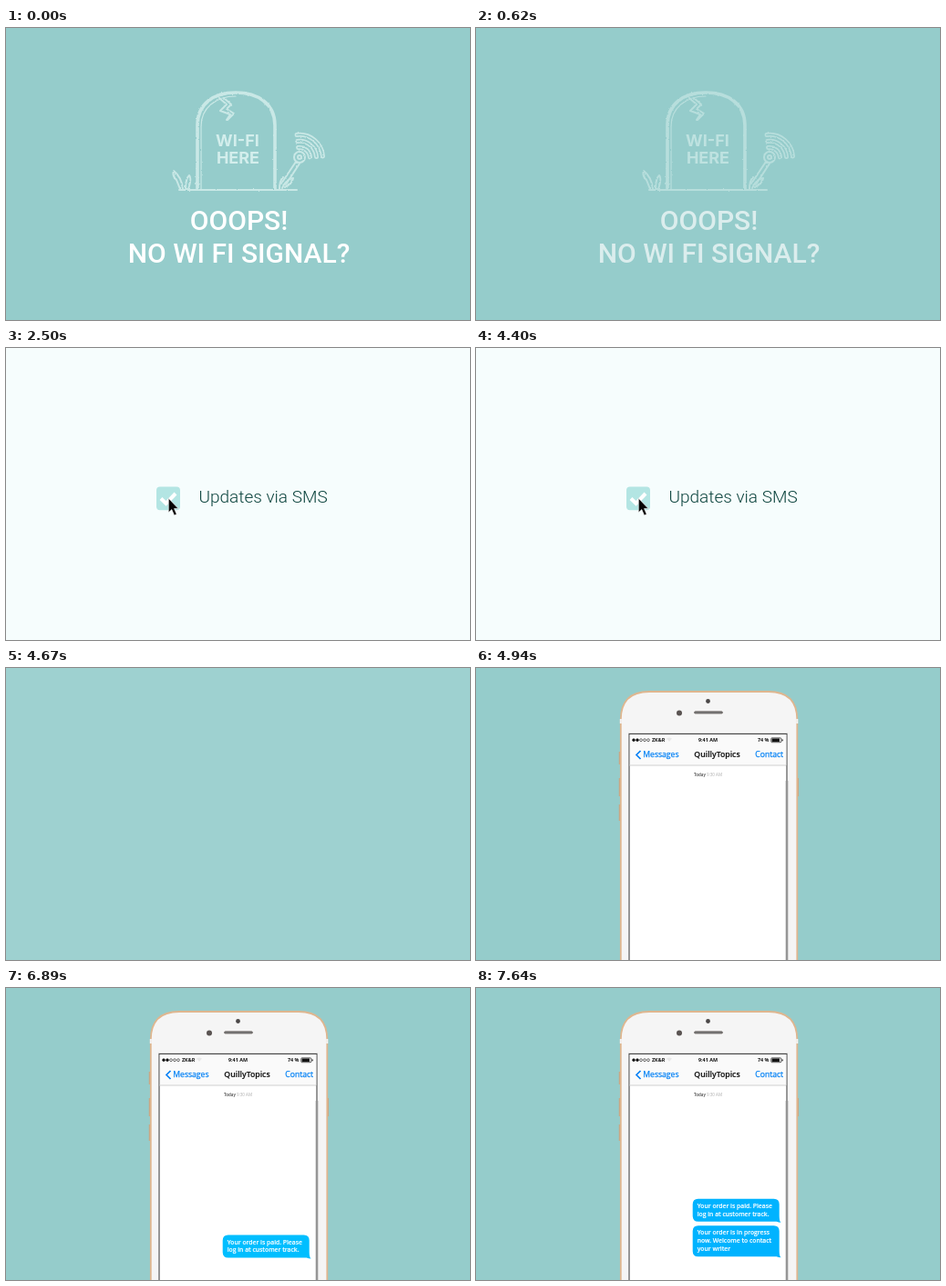
These frames come from a looping animation (509x321 px, 8 s). An HTML page:

```html
<!DOCTYPE html>
<html lang="en">
<head>
<meta charset="utf-8">
<title>Order updates</title>
<style>
  html, body { margin: 0; width: 100%; height: 100%; overflow: hidden; background: #95cccb; }
  svg { display: block; width: 100vw; height: 100vh; }
  .headline { font: 500 30px Roboto, sans-serif; fill: #fff; text-anchor: middle; }
  .stone { font: 700 18px Inter, sans-serif; fill: #d3eeec; text-anchor: middle; }
  .label { font: 300 19px Roboto, sans-serif; }
  .phone text { font-family: "Open Sans", sans-serif; }
  .nav { font-size: 8.6px; fill: #0080f5; stroke: #0080f5; stroke-width: .25px; }
  .title { font-size: 8.7px; font-weight: 600; fill: #111; stroke: #111; stroke-width: .15px; text-anchor: middle; }
  .status { font-size: 5.4px; font-weight: 700; fill: #111; }
  .stamp { font-size: 4.5px; fill: #aaa; text-anchor: middle; }
  .bubble text { font-size: 6.75px; font-weight: 600; fill: #fff; stroke: #fff; stroke-width: .15px; }
</style>
</head>
<body>
<svg viewBox="0 0 509 321" preserveAspectRatio="none">
  <defs>
    <filter id="chalk" x="-5%" y="-5%" width="110%" height="110%">
      <feTurbulence type="fractalNoise" baseFrequency=".3" numOctaves="2" seed="4"/>
      <feDisplacementMap in="SourceGraphic" scale="2.2" xChannelSelector="R" yChannelSelector="G"/>
    </filter>
    <clipPath id="screen"><rect x="168" y="72" width="171.5" height="249"/></clipPath>
  </defs>
  <rect id="back" width="509" height="321" fill="#95cccb"/>

  <g id="grave">
    <g filter="url(#chalk)" fill="none" stroke="#c9e8e6" stroke-width="2" stroke-linecap="round" stroke-linejoin="round">
      <path d="M210 177V107C210 83 228 71 252 71S295 83 295 107V177" stroke-width="3.6"/>
      <path d="M214 177V108C214 88 230 75 252 75" stroke-width="1.2"/>
      <path d="M190 178H319"/>
      <path d="M234 77L242 84L235 91L246 95L242 101M239 77L247 84L242 89L250 94L243 101"/>
      <path d="M194 177C193 167 189 161 184 157Q182 162 187 167L191 177M197 176Q197 166 201 162Q204 165 200 177M300 177Q300 168 304 164M303 176Q307 166 315 165Q314 171 306 175"/>
      <path d="M302 171L318 147M307 172L322 149"/>
      <circle cx="322" cy="142" r="6"/>
      <circle cx="322" cy="142" r="2"/>
      <g id="waves"></g>
    </g>
    <text class="stone" x="254" y="129.500">WI-FI</text>
    <text class="stone" x="254.500" y="149">HERE</text>
    <text class="headline" x="255.500" y="222">OOOPS!</text>
    <text class="headline" x="255.500" y="257.500">NO WI FI SIGNAL?</text>
  </g>

  <g id="form">
    <rect id="outline" x="166.600" y="153.300" width="23.300" height="23.300" rx="1" fill="none" stroke="#a6e2e1" stroke-width="1.800"/>
    <g id="checked">
      <rect id="fill" x="165" y="152.500" width="26" height="25.800" rx="4"/>
      <path d="M170 165.500L175.500 171L186 160" fill="none" stroke="#fff" stroke-width="4"/>
    </g>
    <text class="label" id="label" x="211.500" y="170">Updates via SMS</text>
    <path id="cursor" d="M0 0V15.500L3.500 12.300L6.300 18.600L8.900 17.400L6.200 11.300H10.700Z" fill="#050505" stroke="#fff" stroke-width=".6"/>
  </g>

  <g id="phone" class="phone">
    <path d="M157.500 92V106M157.500 121V141M157.500 150V168M353.300 121V141" stroke="#c9a583" stroke-width="1.500"/>
    <path d="M158.800 325V57Q158.800 26 190 26H321Q352.300 26 352.300 57V325Z" fill="#f5f5f5" stroke="#dfb68f" stroke-width="1.800"/>
    <path d="M158.800 56V61M352.300 56V61" stroke="#f5f5f5" stroke-width="2"/>
    <circle cx="254.500" cy="36.500" r="2.400" fill="#4b4747"/>
    <circle cx="223" cy="49.500" r="3" fill="#5a5452"/>
    <rect x="239.500" y="47.700" width="31" height="2.400" rx="1.200" fill="#777" stroke="#5f5752" stroke-width=".6"/>
    <rect x="168" y="72.500" width="173" height="255" fill="#fff" stroke="#777" stroke-width="1.500"/>
    <path d="M168 72.500H341" stroke="#444" stroke-width="1.200"/>
    <rect x="168.800" y="73" width="171.500" height="34" fill="#fafafa"/>
    <path d="M168 107H340" stroke="#c4c4c4" stroke-width=".8"/>
    <path d="M341 124V321" stroke="#969696" stroke-width="2.600"/>
    <g id="signal" stroke="#111" stroke-width=".6"></g>
    <text class="status" x="193" y="81">ZK&amp;R</text>
    <text class="status" x="254.500" y="81" text-anchor="middle">9:41 AM</text>
    <text class="status" x="309" y="81">74 %</text>
    <path d="M209 77.500Q212 75.500 215 77.500L212 81Z" fill="#e9e9e9"/>
    <rect x="323.800" y="76.900" width="11" height="4.800" rx=".8" fill="#fff" stroke="#111" stroke-width=".7"/>
    <path d="M324.600 77.600H333V81H324.600ZM335.600 78.400H336.700V80.200H335.600Z" fill="#111"/>
    <path d="M180.500 91L176 95.500L180.500 100" fill="none" stroke="#0080f5" stroke-width="1.700"/>
    <text class="nav" x="183.300" y="98.300">Messages</text>
    <text class="title" x="264.500" y="98.300">QuillyTopics</text>
    <text class="nav" x="306.300" y="97.600">Contact</text>
    <text class="stamp" x="254.500" y="119"><tspan fill="#444" font-weight="600">Today</tspan> 9:30 AM</text>
    <g id="chat" clip-path="url(#screen)"></g>
  </g>
</svg>
<script>
const LOOP = 8000;
const TEAL = [149, 204, 203], MINT = [246, 253, 253];
const $ = id => document.getElementById(id);
const clamp = v => Math.min(1, Math.max(0, v));
const span = (t, from, to) => clamp((t - from) / (to - from));
const mix = (a, b, k) => a + (b - a) * k;
const rgb = (a, b, k) => `rgb(${a.map((v, i) => Math.round(mix(v, b[i], k)))})`;
const easeOut = k => 1 - (1 - k) ** 3;
const easeInOut = k => k * k * (3 - 2 * k);

function add(parent, tag, attrs, text = '') {
  const el = document.createElementNS('http://www.w3.org/2000/svg', tag);
  for (const name in attrs) el.setAttribute(name, attrs[name]);
  el.textContent = text;
  return parent.appendChild(el);
}

function show(el, opacity) {
  el.setAttribute('opacity', opacity);
  el.style.display = opacity > 0 ? '' : 'none';
}

const place = (el, x, y) => el.setAttribute('transform', `translate(${x} ${y})`);

// Each wave is a wide pale arc hollowed out by a narrower one.
for (const r of [11.5, 18.5, 25.5]) {
  const d = `M${322 - r * .12} ${143 - r}A${r} ${r} 0 0 1 ${322 + r} ${143 - r * .08}`;
  add($('waves'), 'path', { d, stroke: '#c9e8e6', 'stroke-width': 5 });
  add($('waves'), 'path', { d, stroke: '#95cccb', 'stroke-width': 1.6 });
}

for (let i = 0; i < 5; i++) {
  add($('signal'), 'circle', { cx: 173 + i * 4, cy: 79.2, r: 1.4, fill: i < 2 ? '#111' : '#fff' });
}

function bubble(lines, height) {
  const group = add($('chat'), 'g', { class: 'bubble' });
  const bottom = height - 6;
  const shape = add(group, 'path', {
    d: `M243 0H326Q332 0 332 6V${bottom}Q332 ${height} 334 ${height + 1}Q331 ${height + 1} 329 ${height}` +
       `H243Q237 ${height} 237 ${bottom}V6Q237 0 243 0Z`,
    fill: '#00b3ff'
  });
  lines.forEach((line, i) => add(group, 'text', { x: 242, y: 10 + i * 8.9 }, line));
  return { group, shape };
}

const paid = bubble(['Your order is paid. Please', 'log in at customer track.'], 25);
const progress = bubble(['Your order is in progress', 'now. Welcome to contact', 'your writer'], 34);

function drawForm(t, leave) {
  show($('form'), t < 4400 ? span(t, 880, 1280) : clamp(1 - leave * 1.15));
  const move = easeInOut(span(t, 1300, 1970));
  place($('cursor'), mix(228.8, 178.3, move), mix(208.5, 165.3, move));
  $('label').setAttribute('fill', rgb([95, 128, 123], [12, 68, 62], span(t, 1340, 1850)));
  show($('checked'), t >= 2200 ? 1 : 0);
  show($('outline'), t < 2200 ? 1 : 0);
  $('fill').setAttribute('fill', t < 2500 ? '#a4dfdc' : '#b3e5e3');
}

function drawChat(t) {
  const rise = easeOut(span(t, 6410, 6980));
  const scroll = 39.7 * easeInOut(span(t, 7220, 7640));
  show(paid.group, span(t, 6410, 6800));
  place(paid.group, .7, 271.5 + 13 * (1 - rise) - scroll);
  paid.shape.setAttribute('fill', rgb([0, 190, 255], [0, 179, 255], span(t, 6890, 6980)));
  show(progress.group, span(t, 7220, 7460));
  place(progress.group, .7, 301 - scroll);
}

function draw(t) {
  const leave = span(t, 4400, 4700);
  const mint = span(t, 880, 1280) * (1 - leave);
  $('back').setAttribute('fill', rgb(TEAL, MINT, mint));
  show($('grave'), 1 - span(t, 490, 880));
  drawForm(t, leave);
  show($('phone'), span(t, 4700, 4940));
  drawChat(t);
}

const start = performance.now();
function tick() {
  draw((performance.now() - start) % LOOP);
  requestAnimationFrame(tick);
}
tick();
</script>
</body>
</html>
```
